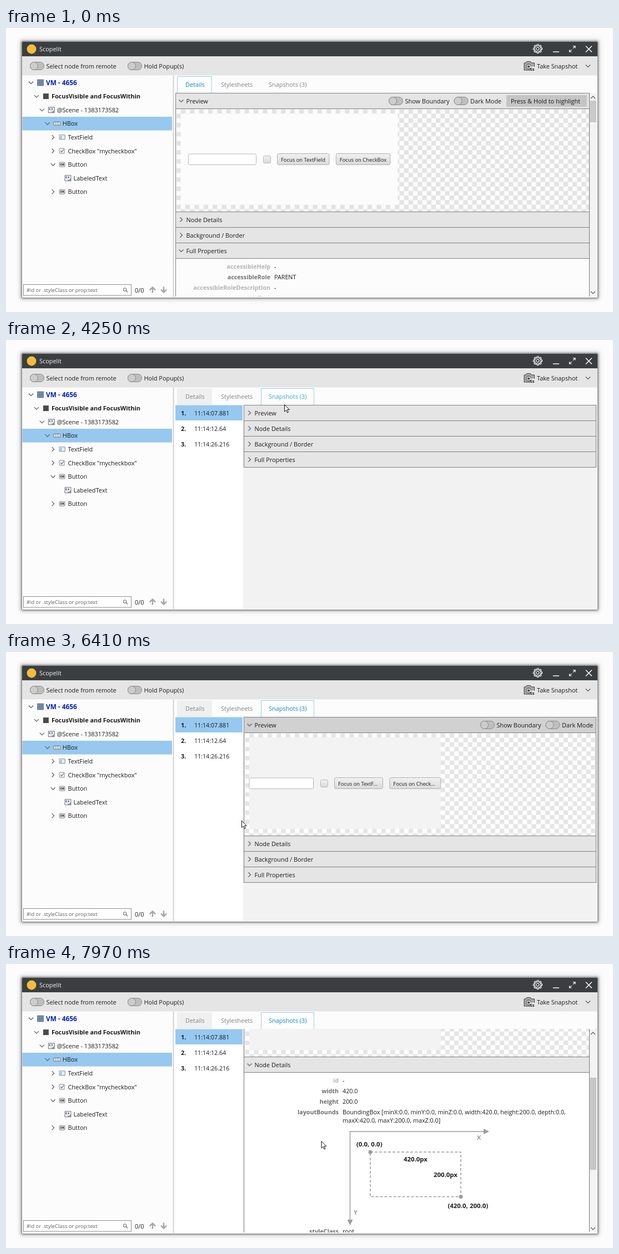
These frames come from a looping animation (1093 by 512 pixels, 8 s). An HTML page:

```html
<!DOCTYPE html>
<html lang="en">
<head>
<meta charset="utf-8">
<title>Node inspector</title>
<style>
html, body { margin: 0; width: 100%; height: 100%; overflow: hidden; background: #fcfcfc; }
.win { position: absolute; left: 29px; top: 25px; width: 1036px; height: 461px;
  box-shadow: 0 0 4px 1px rgba(0,0,0,.6), 0 0 8px 4px rgba(0,0,0,.14); }
svg { position: absolute; left: 0; top: 0; width: 1093px; height: 512px; }
text { font: 10.9px "Open Sans", "Noto Sans", sans-serif; fill: #1c1c1c; white-space: pre; }
.b { font-weight: 700; }
.end { text-anchor: end; }
.line { fill: none; stroke: #555; stroke-width: 1.1; }
.tab { fill: #858585; }
.on { fill: #0a88d2; }
.hot { fill: #36a5e4; }
[data-anim] { animation: 8s step-end infinite; }
</style>
</head>
<body>
<div class="win"></div>
<svg id="stage" viewBox="0 0 1093 512"></svg>
<script>
const GREY = '#e5e5e5', EDGE = '#808080', BLUE = '#96c8f0', AXIS = '#9c9c9c', PALE = '#b4b4b4';
const HEAD = 28, BODY = 186, ROW = 24.6, CELL = 8.2;
let css = '';

// ---- animation helpers: every list entry is [ms, value]
function steps(name, list, rule) {
  const frames = list.map(([ms, v]) => `${ms / 80}%{${rule(v)}}`).join('');
  css += `@keyframes ${name}{${frames}100%{${rule(list[list.length - 1][1])}}}` +
    `[data-anim=${name}]{animation-name:${name}}`;
}
const fade = (name, list) => steps(name, list, v => `opacity:${v}`);
const move = (name, list) => steps(name, list, ([x, y]) => `transform:translate(${x}px,${y}px)`);
const slide = (name, list) => steps(name, list, y => `transform:translateY(${y}px)`);
const turn = (name, list) => steps(name, list, a => `transform:rotate(${a}deg)`);
const show = (name, from, to = 8000) => fade(name, [[0, from ? 0 : 1], [from, 1], [to, 0]].filter(([ms], i) => i === 0 || ms % 8000));

// n evenly spaced samples of f(0..1) between two times
const sample = (t0, t1, n, f) => Array.from({ length: n }, (_, i) => {
  const u = n > 1 ? i / (n - 1) : 0;
  return [t0 + (t1 - t0) * u, f(u)];
});
function bezier(points, u) {
  if (points.length === 1) return points[0];
  return bezier(points.slice(1).map(([x, y], i) =>
    [points[i][0] + (x - points[i][0]) * u, points[i][1] + (y - points[i][1]) * u]), u);
}

// ---- drawing helpers; the y of a text is the middle of its line
const g = (name, body) => `<g data-anim="${name}">${body}</g>`;
const at = (x, y, body, deg = 0) => `<g transform="translate(${x} ${y}) rotate(${deg})">${body}</g>`;
const clip = (id, body) => `<g clip-path="url(#${id})">${body}</g>`;
const rect = (x, y, w, h, fill, more = '') =>
  `<rect x="${x}" y="${y}" width="${w}" height="${h}" fill="${fill}" ${more}/>`;
const box = (x, y, w, h, fill, stroke = EDGE, r = 0) =>
  rect(x, y, w, h, fill, `stroke="${stroke}" rx="${r}"`);
const circle = (x, y, r, fill, stroke = 'none') =>
  `<circle cx="${x}" cy="${y}" r="${r}" fill="${fill}" stroke="${stroke}"/>`;
const path = (d, style = '') => `<path class="line" d="${d}" style="${style}"/>`;
const text = (x, y, s, size = 10.9, style = '', cls = '') =>
  `<text x="${x}" y="${y + 4}" class="${cls}" style="font-size:${size}px;${style}">${s}</text>`;
const bold = (x, y, s, size, style, cls = '') => text(x, y, s, size, style, 'b ' + cls);

const chevron = deg => at(0, 0, path('M-2-4L2 0L-2 4'), deg);
const toggle = (x, y, label) => box(x + .5, y - 7, 25, 14, '#bfbfbf', '#8a8a8a', 7) +
  circle(x + 7.5, y, 7, '#cdcdcd', '#8a8a8a') + text(x + 29.5, y, label);
const head = (x, y, w, label, arrow, hot) => box(x, y, w, HEAD, GREY) +
  (hot ? g(hot, rect(x + .5, y + .5, w - 1, HEAD - 1, '#d1d1d1')) : '') +
  at(x + 10, y + HEAD / 2, arrow) + text(x + 19, y + HEAD / 2, label);
const property = (x, y, key, value, color = '#6e6e6e') =>
  bold(x, y, key, 10.7, `fill:${color}`, 'end') + text(x + 7, y, value, 10.75);

// The checker lines up with the top left corner of the sheet it carries.
function checker(id, x, light, dark) {
  return `<pattern id="${id}" x="${x}" y="154.5" width="${2 * CELL}" height="${2 * CELL}" patternUnits="userSpaceOnUse">` +
    rect(0, 0, 2 * CELL, 2 * CELL, light) + rect(CELL, 0, CELL, CELL, dark) + rect(0, CELL, CELL, CELL, dark) +
    '</pattern>';
}
const region = (id, x, y, w, h) => `<clipPath id="${id}">${rect(x, y, w, h, '#000')}</clipPath>`;
const defs = '<defs>' + checker('chkA', 314.8, '#fcfcfc', '#e3e3e3').replace('rect', 'rect') +
  checker('chkB', 438, '#fff', '#e5e5e5') +
  '<linearGradient id="btn" x2="0" y2="1"><stop stop-color="#f1f1f1"/><stop offset="1" stop-color="#dadada"/></linearGradient>' +
  region('page', 303, 117, 761, 366.5) + region('under', 428, 145.5, 636, 700) +
  region('under2', 428, 359.5, 636, 700) + '</defs>';

// Text field, check box and two buttons in a row
function form(x, field, buttons) {
  let left = x + field + 13;
  let out = box(x, 227, field, 19.5, '#fff', '#b8b8b8', 2.5) + box(left, 230.5, 13, 13, 'url(#btn)', '#b8b8b8', 2);
  left += 25;
  for (const [label, w] of buttons) {
    out += box(left, 226.5, w, 20, 'url(#btn)', '#b2b2b2', 2.5) + text(left + 6.5, 236.5, label, 9.4);
    left += w + 12.3;
  }
  return out;
}

// ---- window frame and tool bar
function frame() {
  const teeth = Array.from({ length: 8 }, (_, i) => at(0, 0, '<path d="M-1.8-5.6L-1.3-8H1.3L1.8-5.6"/>', i * 45)).join('');
  return rect(29, 25, 1036, 461, '#fcfcfc') + rect(29, 25, 1036, 26, '#3b3e40') +
    circle(46, 38, 8.5, '#f2bd3c') + text(60, 38, 'Scopelit', 10.9, 'fill:#f4f4f4') +
    '<g fill="none" stroke="#f4f4f4" stroke-width="1.2">' +
    at(957.5, 37.5, teeth + circle(0, 0, 5.6, 'none', '#f4f4f4') + circle(0, 0, 2.6, 'none', '#f4f4f4')) +
    '<path stroke-width="1.6" d="M985 43H996M1044 32.5L1055 43.5M1055 32.5L1044 43.5"/>' +
    '<path d="M1021 36.5L1025 32.5M1021 32.5H1025V36.5M1018.5 39L1014.5 43M1014.5 39V43H1018.5"/></g>' +
    rect(29, 51, 1036, 34.5, GREY) +
    toggle(43, 68.5, 'Select node from remote') + toggle(219, 68.5, 'Hold Popup(s)') +
    '<path d="M933 63h3l1.5-2.5h7L946 63h5.5v13h-18.5z" fill="#a8a8a8" stroke="#3d3d3d"/>' +
    circle(941, 69.5, 4.4, '#ddd', '#3d3d3d') + circle(941, 69.5, 2.2, '#555') +
    rect(944, 69.5, 9, 8, GREY) + bold(943.5, 73, '5s', 7.5) +
    text(956, 68.5, 'Take Snapshot') + at(1048, 68.5, chevron(90));
}

// ---- node tree
const icons = {
  vm: rect(0, -6, 12, 12, '#7088a6'),
  app: rect(1, -5, 10, 10, '#4a4a4a'),
  scene: box(.5, -5, 11, 10, '#eee', '#777') + path('M4-3L2-1.5L4 0M6-3L8-1.5L6 0M6 3.5H10V1', 'stroke:#4d6a88'),
  ok: box(.5, -4, 10, 8, '#e8e8e8', '#888', 1) + bold(1.6, -2, 'OK', 5.5),
  field: box(.5, -4, 10, 8, '#e4eef5', '#7795ab') + path('M3.5-2V2.5', 'stroke:#3c78a5'),
  check: box(.5, -4.5, 9, 9, '#f4f4f4', '#888', 1) + path('M3 0L4.6 2L8-2.5'),
  hbox: box(.5, -3, 11, 6, '#f5f5f5', '#777') + path('M4.2-3V3M7.9-3V3', 'stroke:#777')
};
function tree() {
  const rows = [
    [0, 'open', 'vm', 'VM - 4656'],
    [1, 'open', 'app', 'FocusVisible and FocusWithin'],
    [2, 'open', 'scene', '@Scene - 1383173582'],
    [3, 'open', 'hbox', 'HBox'],
    [4, 'shut', 'field', 'TextField'],
    [4, 'shut', 'check', 'CheckBox "mycheckbox"'],
    [4, 'open', 'ok', 'Button'],
    [5, 'leaf', 'scene', 'LabeledText'],
    [4, 'shut', 'ok', 'Button']];
  const body = rows.map(([depth, state, icon, label], i) => at(45 + depth * 9.9, 98.5 + i * ROW,
    (state === 'leaf' ? '' : chevron(state === 'open' ? 90 : 0)) + at(11, 0, icons[icon]) +
    (icon === 'vm' ? bold(27, 0, label, 11.8, 'fill:#0020c0') : (icon === 'app' ? bold : text)(27, 0, label)))).join('');
  const arrow = '<path d="M0 5.5V-4.5M-5 .5L0-4.5L5 .5" fill="none" stroke="#a3a3a3" stroke-width="2.4"/>';
  return rect(29.5, 160, 269.5, ROW, BLUE) + body + box(31.5, 462.5, 194, 19.5, '#fff', '#8c8c8c') +
    text(37, 472, '#id or .styleClass or prop:text', 9.35, 'opacity:.7') +
    circle(214, 471.5, 2.8, 'none', '#555') + path('M216 473.6L219 476.6') + text(232, 472.5, '0/0') +
    at(264, 472, arrow) + at(284, 472, arrow, 180) + rect(300.5, 85.5, 2, 400, '#d4d4d4');
}

// ---- tabs
function tabs() {
  const page = (x, w) => box(x, 87.5, w, 31, '#fdfdfd', '#a3cde6');
  const details = cls => text(323, 102, 'Details', 10.9, '', cls);
  const sheets = cls => text(387, 102, 'Stylesheets', 10.9, '', cls);
  const snaps = cls => text(473, 102, 'Snapshots (3)', 10.9, '', cls);
  return sheets('tab') + g('sheetHot', sheets('on')) +
    g('first', page(308.5, 61.5) + details('on') + g('detailHot', page(308.5, 61.5) + details('hot')) +
      g('snapOff', snaps('tab')) + g('snapOver', snaps('on'))) +
    g('second', rect(308, 87, 63, 30, '#efefef') + details('tab') + page(459.5, 95) +
      g('currentHot', snaps('hot')) + g('currentOn', snaps('on')));
}
show('sheetHot', 1600, 1690);
show('detailHot', 1140, 1600);
show('snapOff', 0, 1690);
show('snapOver', 1690);
show('currentHot', 3320, 4330);
show('currentOn', 4330);
for (const name of ['first', 'pageA']) show(name, 0, 3320);
for (const name of ['second', 'pageB']) show(name, 3320);

const scrollbar = thumb => rect(1051, 118, 12.5, 365, '#f3f3f3') + thumb +
  at(1057, 125, chevron(-90)) + at(1057, 477, chevron(90)) + path('M1050.5 117.5V483', `stroke:${EDGE}`);

// ---- first page
function detailsPage() {
  const x = 305.5, w = 745;
  const sections = [['Node Details', 0], ['Background / Border', 0], ['Full Properties', 90]];
  const rows = [['accessibleHelp', '-', PALE], ['accessibleRole', 'PARENT', '#747474'],
    ['accessibleRoleDescription', '-', PALE], ['accessibleText', '-', PALE]];
  return box(x, 117.5, w, 400, '#fcfcfc') + rect(x + .5, 145.5, w - 1, BODY, 'url(#chkA)') +
    rect(314.8, 154.5, 390.5, 20 * CELL, '#fcfcfc') +
    form(328.5, 122, [['Focus on TextField', 93.5], ['Focus on CheckBox', 97.5]]) +
    head(x, 117.5, w, 'Preview', chevron(90)) +
    toggle(689, 131.5, 'Show Boundary') + toggle(806.5, 131.5, 'Dark Mode') +
    rect(901, 121, 145, 21, '#c5c5c5') + text(909, 131.5, 'Press &amp; Hold to highlight') +
    sections.map(([label, deg], i) => head(x, 331.5 + i * HEAD, w, label, chevron(deg))).join('') +
    rows.map(([key, value, color], i) => property(476, 430 + i * 19, key, value, color)).join('') +
    scrollbar(rect(1051.5, 131, 11.5, 39, '#c9c9c9'));
}

// ---- second page
function geometry() {
  const stroke = `stroke:${AXIS};stroke-width:1.5`;
  const rows = [['id', '-', PALE], ['width', '420.0'], ['height', '200.0'], ['layoutBounds',
    'BoundingBox [minX:0.0, minY:0.0, minZ:0.0, width:420.0, height:200.0, depth:0.0,']];
  return rect(428.5, -100, 635, 760, '#fff') + path('M428.5-100V660', `stroke:${EDGE}`) +
    rows.map(([key, value, color], i) => property(599, 210 + i * 19, key, value, color)).join('') +
    text(606, 281.5, 'maxX:420.0, maxY:200.0, maxZ:0.0]', 10.75) +
    path('M619.5 462V302H862', stroke) +
    `<path d="M860 297L870 302L860 307zM614.5 461H624.5L619.5 471z" fill="${AXIS}"/>` +
    bold(848, 313, 'X', 10.9, `fill:${AXIS}`) + bold(626, 448, 'Y', 10.9, `fill:${AXIS}`) +
    path('M656 339H819V419.5H656z', stroke + ';stroke-dasharray:5 3') +
    circle(656, 339, 3.5, AXIS) + circle(819, 419.5, 3.5, AXIS) +
    bold(631, 325, '(0.0, 0.0)', 11.4) + bold(716, 351.5, '420.0px', 11.4) +
    bold(770, 379.5, '200.0px', 11.4) + bold(795.5, 436, '(420.0, 200.0)', 11.4) +
    property(599, 482, 'styleClass', 'root');
}
function snapshotsPage() {
  const x = 428.5, w = 634;
  const list = ['11:14:07.881', '11:14:12.64', '11:14:26.216'].map((time, i) =>
    bold(315, 131.5 + i * HEAD, i + 1 + '.') + text(339, 131.5 + i * HEAD, time, 10.65)).join('');
  const preview = box(x, 145.5, w, BODY, 'url(#chkB)') + rect(438, 154.5, 42 * CELL, 20 * CELL, '#f3f3f3') +
    form(438, 115.5, [['Focus on TextF...', 87], ['Focus on Check...', 92]]);
  const rest = rect(428, 359.5, 636, 500, '#f2f2f2') + path('M428 359.5H1064', `stroke:${EDGE}`);
  const content = clip('under', g('preview', preview)) +
    g('node', clip('under2', g('nodeBody', at(0, 164, geometry()))) + g('rest', g('restSlide', rest))) +
    g('lower', head(x, 331.5, w, 'Node Details', g('nodeTurn', chevron(0)), 'nodeHot') +
      g('others', head(x, 359.5, w, 'Background / Border', chevron(0)) +
        head(x, 387.5, w, 'Full Properties', chevron(0)))) +
    head(x, 117.5, w, 'Preview', g('previewTurn', chevron(0)), 'previewHot') +
    g('switches', g('nudge', toggle(854, 131.5, 'Show Boundary') + toggle(971.5, 131.5, 'Dark Mode')));
  return rect(303, 117, 124, 368, '#fff') + rect(305, 117.5, 121, HEAD - .5, BLUE) + list +
    rect(427, 117, 637, 368, '#f2f2f2') + clip('page', g('scroll', content)) +
    g('bar', scrollbar(g('thumbMove', '<rect data-anim="thumb" x="1051.5" y="131" width="11.5" fill="#c6c6c6"/>')));
}

// Both sections open in five ticks.
const openPreview = f => [[0, f(0)], ...sample(5020, 5330, 5, u => f(1 - (.8 * (1 - u)) ** 1.3))];
const openNode = f => [[0, f(0)], ...sample(6880, 7190, 5, u => f((.2 + .8 * u) ** 1.6))];
for (const name of ['preview', 'lower']) slide(name, openPreview(p => BODY * (p - 1)));
turn('previewTurn', openPreview(p => 90 * p));
show('previewHot', 4330, 6880);
show('switches', 5020);
slide('nodeBody', openNode(p => 254 * (p - 1)));
slide('restSlide', openNode(p => 254 * p));
turn('nodeTurn', openNode(p => 90 * p));
steps('thumb', openNode(p => 300 - 134 * p), h => `height:${h}px`);
show('nodeHot', 6880, 7420);
show('others', 0, 6880);
show('rest', 0, 7190);
for (const name of ['node', 'bar']) show(name, 6880);
move('nudge', [[0, [0, 0]], [6880, [-11.5, 0]]]);
const scrolled = k => [[0, 0], [7480, 82 * k], [7970, 164 * k]];
slide('scroll', scrolled(-1));
slide('thumbMove', scrolled(.451));

// ---- pointer strokes: start, end, ticks, curve points
const strokes = [
  [600, 1220, 9, [881, 441], [260, 395], [341, 104]],
  [1600, 1690, 2, [430, 103], [552, 102]],
  [1840, 1920, 2, [535, 102], [519, 102]],
  [2070, 2620, 8, [521, 103], [553, 110], [535, 103]],
  [2930, 3000, 2, [524, 103], [515, 103]],
  [3170, 3320, 3, [511, 106], [509, 97]],
  [3470, 3470, 1, [500, 92]],
  [4250, 5020, 11, [501, 116], [385, 140], [441, 129]],
  [5880, 5880, 1, [440, 144]],
  [6110, 6730, 9, [439, 160], [407, 410], [439, 348]],
  [7420, 7420, 1, [575, 335]],
  [7650, 7800, 3, [572, 330], [567.5, 319]]];
move('pointer', [[0, [0, 0]], ...strokes.flatMap(([t0, t1, n, ...pts]) => sample(t0, t1, n, u => bezier(pts, u)))]);
const overHead = [[0, 0], [4327, 1], [6110, 0], [6490, 1], [7420, 0]];
fade('hand', overHead);
fade('arrow', overHead.map(([ms, v]) => [ms, 1 - v]));
show('cursor', 600);
const cursor = g('cursor', g('pointer', '<g fill="#fff" stroke="#111" stroke-linejoin="round">' +
  g('arrow', '<path d="M.5.5V13L3.4 10.3L5.4 15L7.4 14.1L5.4 9.6H9.3z"/>') +
  g('hand', '<path d="M-1.4 11V1.4Q0-.6 1.4 1.4V6Q3.4 4.6 4 6.4Q5.6 5.4 6.2 7Q8 6.4 8 8.4V13Q7.6 15 6.6 18H-.4Q-2.4 15-4.8 11.4Q-5 9-2.6 10z"/>') +
  '</g>'));

document.getElementById('stage').innerHTML = defs + frame() + tree() + tabs() +
  g('pageA', clip('page', detailsPage())) + g('pageB', snapshotsPage()) + cursor;
const sheet = document.createElement('style');
sheet.textContent = css;
document.head.append(sheet);
</script>
</body>
</html>
```
